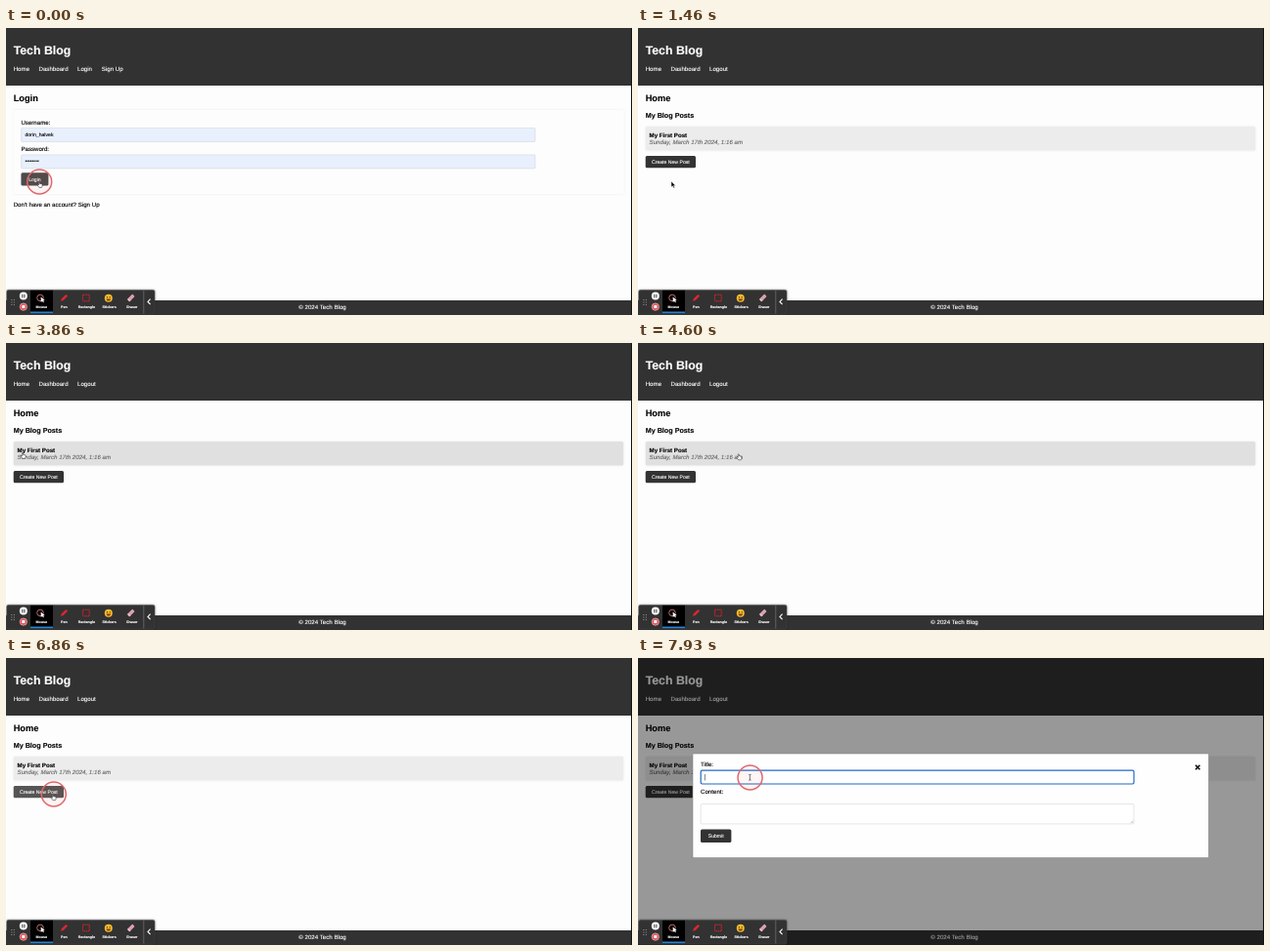
Recreate the animation shown at these times as an HTML page. Size 640 px wide and 294 px high, loop 8 s.

```html
<!DOCTYPE html>
<html lang="en">
<head>
<meta charset="utf-8">
<title>Tech Blog</title>
<style>
html, body { margin: 0; width: 100%; height: 100%; overflow: hidden; background: #fdfdfd; }
svg { display: block; width: 100vw; height: 100vh; }
text { font: 6.15px "Liberation Sans", Arial, sans-serif; text-rendering: geometricPrecision; white-space: pre; stroke: #000; stroke-width: .12; }
.h1 { font-size: 12.3px; font-weight: bold; }
.h2 { font-size: 9.23px; font-weight: bold; }
.h3 { font-size: 7.2px; font-weight: bold; }
.bold { font-weight: bold; }
.date { font-style: italic; fill: #666; stroke: #666; }
.control { font-size: 5.13px; }
.light, .light text { fill: #fff; stroke: #fff; }
.field { stroke: #ccc; stroke-width: .5; }
.button { fill: #333; }
#labels text { font-size: 3.65px; font-weight: bold; text-anchor: middle; }
</style>
</head>
<body>
<svg viewBox="0 0 640 294" preserveAspectRatio="none">
  <defs>
    <filter id="soft" x="-5%" y="-20%" width="110%" height="140%">
      <feDropShadow dx="0" dy="0" stdDeviation=".8" flood-opacity=".08"/>
    </filter>
    <filter id="deep" x="-5%" y="-20%" width="110%" height="140%">
      <feDropShadow dx="0" dy="0" stdDeviation="1" flood-opacity=".5"/>
    </filter>
  </defs>
  <rect width="640" height="294" fill="#fdfdfd"/>
  <rect width="640" height="59" fill="#323232"/>
  <rect y="279" width="640" height="15" fill="#323232"/>
  <g class="light">
    <text class="h1" x="7.7" y="27.1">Tech Blog</text>
    <text x="7.7" y="43.5">Home</text>
    <text x="33.5" y="43.5">Dashboard</text>
    <text x="323.5" y="288.3" text-anchor="middle">© 2024 Tech Blog</text>
  </g>

  <g id="loginPage">
    <text class="light" x="73" y="43.5">Login</text>
    <text class="light" x="97.8" y="43.5">Sign Up</text>
    <text class="h2" x="7.7" y="75.2">Login</text>
    <rect x="7.7" y="84" width="624" height="86" rx="1.5" fill="#fdfdfd" filter="url(#soft)"/>
    <text x="15.4" y="98.5">Username:</text>
    <rect class="field" x="15.6" y="102.4" width="525.4" height="14" rx="1" fill="#e8f0fe"/>
    <text class="control" x="19.4" y="111">dorin_halvek</text>
    <text x="15.4" y="126">Password:</text>
    <rect class="field" x="15.6" y="129.9" width="525.4" height="14" rx="1" fill="#e8f0fe"/>
    <text class="control" x="19.4" y="138.4">••••••••</text>
    <rect x="15.4" y="148.2" width="28" height="13.2" rx="1.5" fill="#4b4b4b"/>
    <text class="control light" x="29.4" y="156.5" text-anchor="middle">Login</text>
    <text x="7.7" y="182.6">Don't have an account? Sign Up</text>
  </g>

  <g id="homePage">
    <text class="light" x="73" y="43.5">Logout</text>
    <text class="h2" x="7.7" y="75.2">Home</text>
    <text class="h3" x="7.7" y="91.8">My Blog Posts</text>
    <rect id="post" x="7.7" y="101" width="623.6" height="24.4" rx="1.5" filter="url(#soft)"/>
    <text class="bold" x="11.6" y="112">My First Post</text>
    <text class="date" x="11.6" y="119.1">Sunday, March 17th 2024, 1:16 am</text>
    <rect id="create" x="7.7" y="131" width="51.3" height="12.2" rx="1.5"/>
    <text class="control light" x="33.4" y="138.7" text-anchor="middle">Create New Post</text>
  </g>

  <g id="modal">
    <rect width="640" height="294" opacity=".4"/>
    <rect x="56" y="98" width="527.4" height="106.7" fill="#fefefe" stroke="#888" stroke-width=".6"/>
    <text x="64" y="111.3">Title:</text>
    <rect id="titleField" x="64.2" y="115.2" width="442.8" height="13.8" rx="1.4" fill="#fff"/>
    <path id="caret" d="M68.4 119v6.5" stroke="#000" stroke-width=".5"/>
    <text x="64" y="138.8">Content:</text>
    <rect class="field" x="64.2" y="149.6" width="442.8" height="20.3" rx="1.2" fill="#fff"/>
    <path d="M503.6 169l2.6-2.6M505.2 169l1-1" stroke="#777" stroke-width=".4"/>
    <rect class="button" x="64" y="175.6" width="31.4" height="13.3" rx="1.5"/>
    <text class="control light" x="79.7" y="183.9" text-anchor="middle">Submit</text>
    <path d="M570 109.8l4.4 4.4m0-4.4l-4.4 4.4" stroke="#000" stroke-width="1.5"/>
  </g>

  <path d="M639.5 0V294" stroke="#111" stroke-width="1"/>

  <g id="toolbar">
    <rect x=".8" y="268.4" width="151.2" height="24.6" rx="1.6" fill="#303030" stroke="#4a4a4a" stroke-width=".5" filter="url(#deep)"/>
    <path d="M5.8 278v7M8.3 278v7" stroke="#999" stroke-width="1" stroke-dasharray="1 1.5"/>
    <circle cx="17.8" cy="274.6" r="4" fill="#fff"/>
    <path d="M16.8 272.8v3.6M18.9 272.8v3.6" stroke="#222" stroke-width=".9"/>
    <circle cx="17.8" cy="285.6" r="3.7" fill="#e2555c" stroke="#f3c4c4" stroke-width=".6"/>
    <rect x="16.3" y="284.1" width="3" height="3" rx=".5" fill="#fff"/>
    <rect x="25" y="268.8" width="23" height="23.4" fill="#000"/>
    <rect x="25" y="290.5" width="23" height="1.7" fill="#2484d8"/>
    <circle cx="35" cy="276.4" r="3.3" fill="none" stroke="#e88" stroke-width=".8"/>
    <path d="M35.6 275.5l.2 5.4 1.3-1.2 .9 1.6 .9-.5-.8-1.6 1.6-.3z" fill="#fff"/>
    <path d="M56 279.8l1-2.7 4.4-4.2 1.7 1.7-4.4 4.3z" fill="#e0262d"/>
    <rect x="78.6" y="273.2" width="6.6" height="6.6" fill="none" stroke="#d9232b" stroke-width="1" stroke-dasharray="1.4 .5"/>
    <circle cx="104.8" cy="276.8" r="4" fill="#fbbd2c"/>
    <circle cx="103.4" cy="275.8" r=".6"/><circle cx="106.2" cy="275.8" r=".6"/>
    <path d="M102.5 277.4h4.6q-.4 2.2-2.3 2.2t-2.3-2.2z" fill="#7a3b12"/>
    <rect x="-3.9" y="-1.7" width="7.8" height="3.4" rx=".8" fill="#dca0ae" transform="translate(127.7 276.5) rotate(-45)"/>
    <path d="M124.9 277.6l2 2" stroke="#fff" stroke-width=".8"/>
    <path d="M140.8 268.6v24" stroke="#777" stroke-width=".7"/>
    <path d="M147.6 277.6l-2.6 2.8 2.6 2.8" fill="none" stroke="#fff" stroke-width="1.1"/>
    <g id="labels" class="light">
      <text x="36.2" y="287">Mouse</text><text x="59.3" y="287">Pen</text>
      <text x="82.4" y="287">Rectangle</text><text x="105.6" y="287">Stickers</text>
      <text x="128.8" y="287">Eraser</text>
    </g>
  </g>

  <circle id="ring" r="12.5" fill="#e33" fill-opacity=".05" stroke="#e0686c" stroke-width="1.5"/>
  <g id="cursor" stroke-linejoin="round">
    <path id="arrow" d="M0 0v6l1.4-1.2 1 2.2 1.1-.5-1-2.1h1.9z" stroke="#fff" stroke-width=".5"/>
    <path id="hand" d="M-.6 .7q.6-1 1.1 0v1.7q2.2 0 2.6 .9v1.7l-.7 1.4h-2.5l-2-2.6q.2-.9 1.1-.2l.4.4z" fill="#fff" stroke="#222" stroke-width=".55"/>
    <path id="beam" d="M-1.2-3q1.2 0 1.2.8v4.4q0 .8-1.2.8M1.2-3q-1.2 0-1.2.8m0 4.4q0 .8 1.2.8" fill="none" stroke="#222" stroke-width=".6"/>
  </g>
</svg>
<script>
const LOOP = 8000, LOGIN_DONE = 600, MODAL_OPEN = 6930, FOCUS = 7740;
const el = id => document.getElementById(id);
const show = (id, on) => el(id).style.display = on ? "" : "none";
const ramp = (t, start, length) => Math.min(1, Math.max(0, (t - start) / length));

// [time, x, y]
const path = [
  [0, 34, 157], [2200, 34, 157], [2660, 21, 97.5], [3030, 15.5, 84], [3860, 17, 112],
  [4800, 114, 113.5], [5000, 114, 113.5], [5530, 102.3, 176.5], [6600, 48, 139.3],
  [6950, 48, 139.3], [7640, 114.4, 122.3], [LOOP, 114.4, 122.3]
];
// Each pointer lasts until the given time.
const pointers = [
  [1460, "hand"], [2500, "arrow"], [2740, "hand"], [3500, "arrow"], [5180, "hand"],
  [6400, "arrow"], [6990, "hand"], [7500, "arrow"], [LOOP, "beam"]
];
// Each ring shows from press, fades between release and gone.
const clicks = [
  { press: 0, release: 60, gone: 400, x: 34.2, y: 157.5 },
  { press: 6760, release: 6920, gone: 7260, x: 48.8, y: 139.5 },
  { press: FOCUS, release: LOOP, gone: LOOP + 340, x: 114.6, y: 122.5 }
];

function cursorAt(t) {
  const i = path.findIndex(p => p[0] > t);
  const [t0, x0, y0] = path[i - 1], [t1, x1, y1] = path[i];
  const u = ramp(t, t0, t1 - t0), k = u * u * (3 - 2 * u);
  return [x0 + (x1 - x0) * k, y0 + (y1 - y0) * k];
}

function draw(t) {
  const [x, y] = cursorAt(t);
  show("loginPage", t < LOGIN_DONE);
  show("homePage", t >= LOGIN_DONE);
  show("modal", t >= MODAL_OPEN);
  el("labels").setAttribute("opacity", t < LOGIN_DONE ? 1 : ramp(t, 660, 600));

  const hover = ramp(t, 3450, 300) - ramp(t, 5600, 300);
  const grey = Math.round(236 - 12 * hover);
  el("post").setAttribute("fill", `rgb(${grey},${grey},${grey})`);
  const overCreate = t < MODAL_OPEN && x < 59 && y > 131 && y < 143.2;
  el("create").setAttribute("fill", overCreate && t > 5000 ? "#555" : "#333");

  const focused = t >= FOCUS;
  el("titleField").setAttribute("stroke", focused ? "#2469c4" : "#ccc");
  el("titleField").setAttribute("stroke-width", focused ? 1.2 : .5);
  show("caret", focused);

  const click = clicks.find(c => t >= c.press && t < c.gone);
  show("ring", click);
  if (click) {
    el("ring").setAttribute("transform", `translate(${click.x} ${click.y})`);
    el("ring").setAttribute("opacity", 1 - ramp(t, click.release, click.gone - click.release));
  }

  const pointer = pointers.find(p => t < p[0])[1];
  for (const name of ["arrow", "hand", "beam"]) show(name, name === pointer);
  el("cursor").setAttribute("transform", `translate(${x} ${y})`);
}

const begin = performance.now();
function tick() {
  draw((performance.now() - begin) % LOOP);
  requestAnimationFrame(tick);
}
tick();
</script>
</body>
</html>
```
